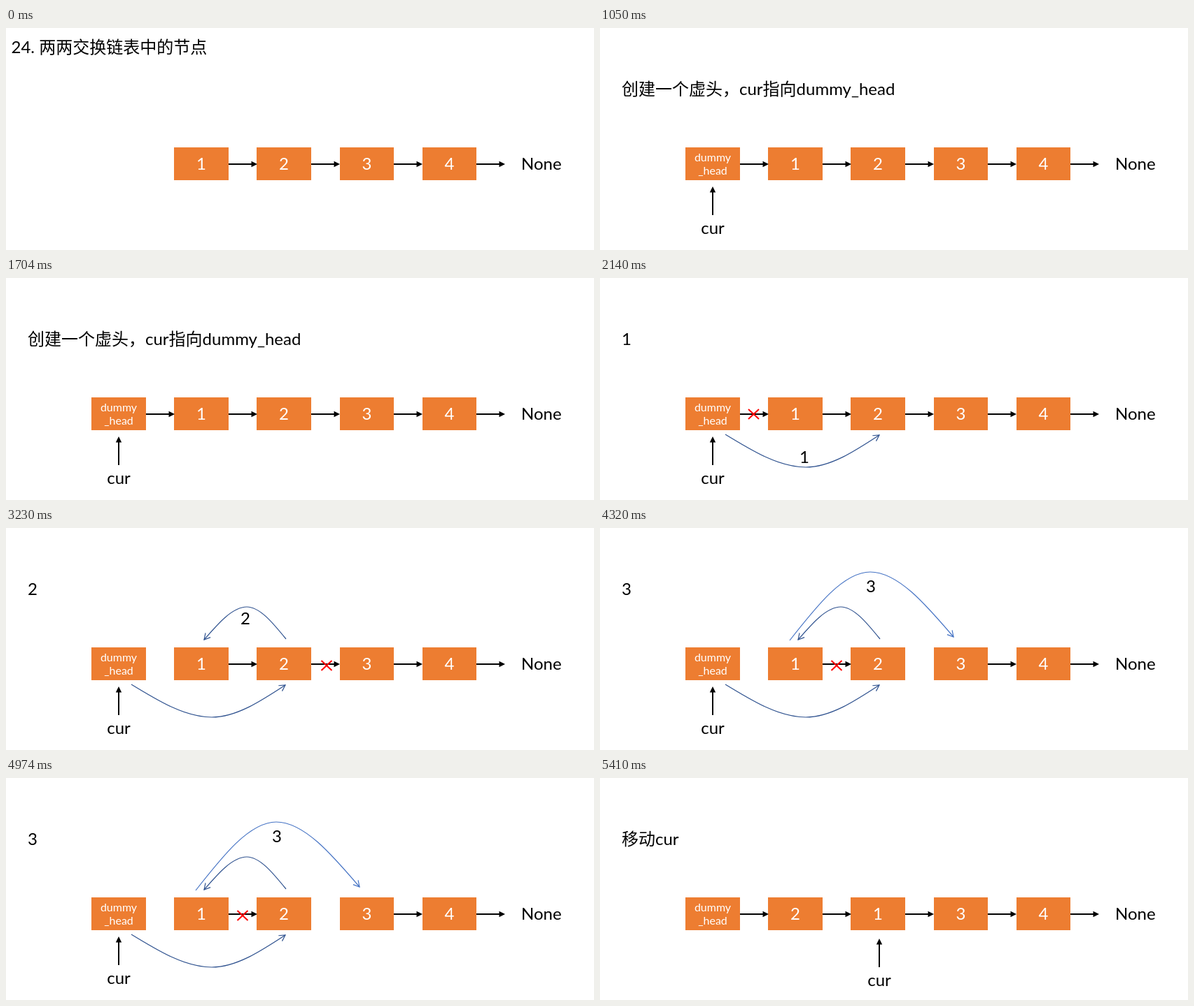
An HTML page that plays this animation: 840 by 318 pixels, repeating every 6.5 s.

```html
<!DOCTYPE html>
<html lang="zh-CN">
<head>
<meta charset="utf-8">
<title>链表节点交换</title>
<style>
  html, body { margin: 0; width: 100%; height: 100%; overflow: hidden; background: #fff; }
  svg { display: block; font: 24px Lato, "Noto Sans CJK SC", "Noto Sans CJK", sans-serif; }
  rect { fill: #ed7d31; shape-rendering: crispEdges; }
  .mid { text-anchor: middle; }
  .node { fill: #fff; text-anchor: middle; }
  .small { font-size: 16px; }
  .line { stroke: #000; stroke-width: 2; }
  .cross { stroke: #f00; stroke-width: 2; }
  .arc { fill: none; stroke-width: 1.2; }
</style>
</head>
<body>
<svg id="stage" width="840" height="318" viewBox="0 0 840 318"></svg>
<script>
const LOOP = 6500, DARK = '#2f528f', BLUE = '#4472c4';
const slotX = i => Math.round(122 + 118.2 * i);
const slotEnd = i => Math.round(199.6 + 118.2 * i);

const text = (x, y, str, cls = '') => `<text x="${x}" y="${y}" class="${cls}">${str}</text>`;

// Straight arrow, 41 px long, with a solid head.
const arrow = (x, y, angle = 0) => `<g transform="translate(${x} ${y}) rotate(${angle})">
  <path class="line" d="M0 0H34"/><path d="M41 0L32.5 -4.2V4.2Z"/></g>`;

function node(slot, label) {
  const x = slotX(slot), w = slotEnd(slot) - x, mid = x + w / 2;
  const box = `<rect x="${x}" y="171" width="${w}" height="47"/>`;
  return box + (label === 'dummy_head'
    ? text(mid, 191, 'dummy', 'node small') + text(mid, 210, '_head', 'node small')
    : text(mid, 203, label, 'node'));
}

const link = slot => arrow(slotEnd(slot), 195);
const cross = (x, y) => `<path class="cross" d="M${x - 7.5} ${y - 7}l15 14m0 -14l-15 14"/>`;
const cursor = (x, y) => arrow(x, y, -90) + text(x, y + 27, 'cur', 'mid');

// Two joined Béziers through a level turning point, ending in an open head.
function arc([x0, y0], [xm, ym], [x1, y1], color) {
  const a = [x0 + (xm - x0) / 3, y0 + (ym - y0) / 2];
  const b = [x0 + (xm - x0) * 2 / 3, ym];
  const c = [xm + (x1 - xm) / 3, ym];
  const d = [xm + (x1 - xm) * 2 / 3, (ym + y1) / 2];
  const angle = Math.atan2(y1 - d[1], x1 - d[0]) * 180 / Math.PI;
  return `<g class="arc" stroke="${color}">
    <path d="M${x0} ${y0}C${a} ${b} ${xm} ${ym}C${c} ${d} ${x1} ${y1}"/>
    <path d="M-8.5 -4.7L0 0L-8.5 4.7" transform="translate(${x1} ${y1}) rotate(${angle})"/></g>`;
}

const headToSecond = arc([179, 224], [294, 271], [399, 225], DARK);
const secondToFirst = arc([400, 159], [344, 113], [283, 160], DARK);
const firstToThird = arc([271, 161], [386, 63], [505, 156], BLUE);

const caption = str => text(31, 96, str);
const list = (labels, links, first = 0) =>
  labels.map((label, i) => node(first + i, label)).join('') +
  links.map(link).join('') + text(736, 203, 'None');

const labels = ['dummy_head', 1, 2, 3, 4];
const allLinks = [0, 1, 2, 3, 4];
const startCursor = cursor(161, 268);

const scenes = [
  [0, text(7.5, 36, '24. 两两交换链表中的节点') + list([1, 2, 3, 4], [1, 2, 3, 4], 1)],
  [1050, caption('创建一个虚头，cur指向dummy_head') + list(labels, allLinks) + startCursor],
  [2140, caption('1') + list(labels, allLinks) + startCursor +
    cross(219.5, 195) + headToSecond + text(292, 265, '1', 'mid')],
  [3230, caption('2') + list(labels, [1, 2, 3, 4]) + startCursor +
    cross(458, 197) + headToSecond + secondToFirst + text(342, 138, '2', 'mid')],
  [4320, caption('3') + list(labels, [1, 3, 4]) + startCursor +
    cross(338, 197) + headToSecond + secondToFirst + firstToThird + text(387, 92, '3', 'mid')],
  [5410, caption('移动cur') + list(['dummy_head', 2, 1, 3, 4], allLinks) + cursor(399, 271)],
];

const stage = document.getElementById('stage');
let shown;
function draw() {
  const t = performance.now() % LOOP;
  const scene = scenes.findLast(([start]) => t >= start);
  if (scene !== shown) stage.innerHTML = (shown = scene)[1];
  requestAnimationFrame(draw);
}
draw();
</script>
</body>
</html>
```
